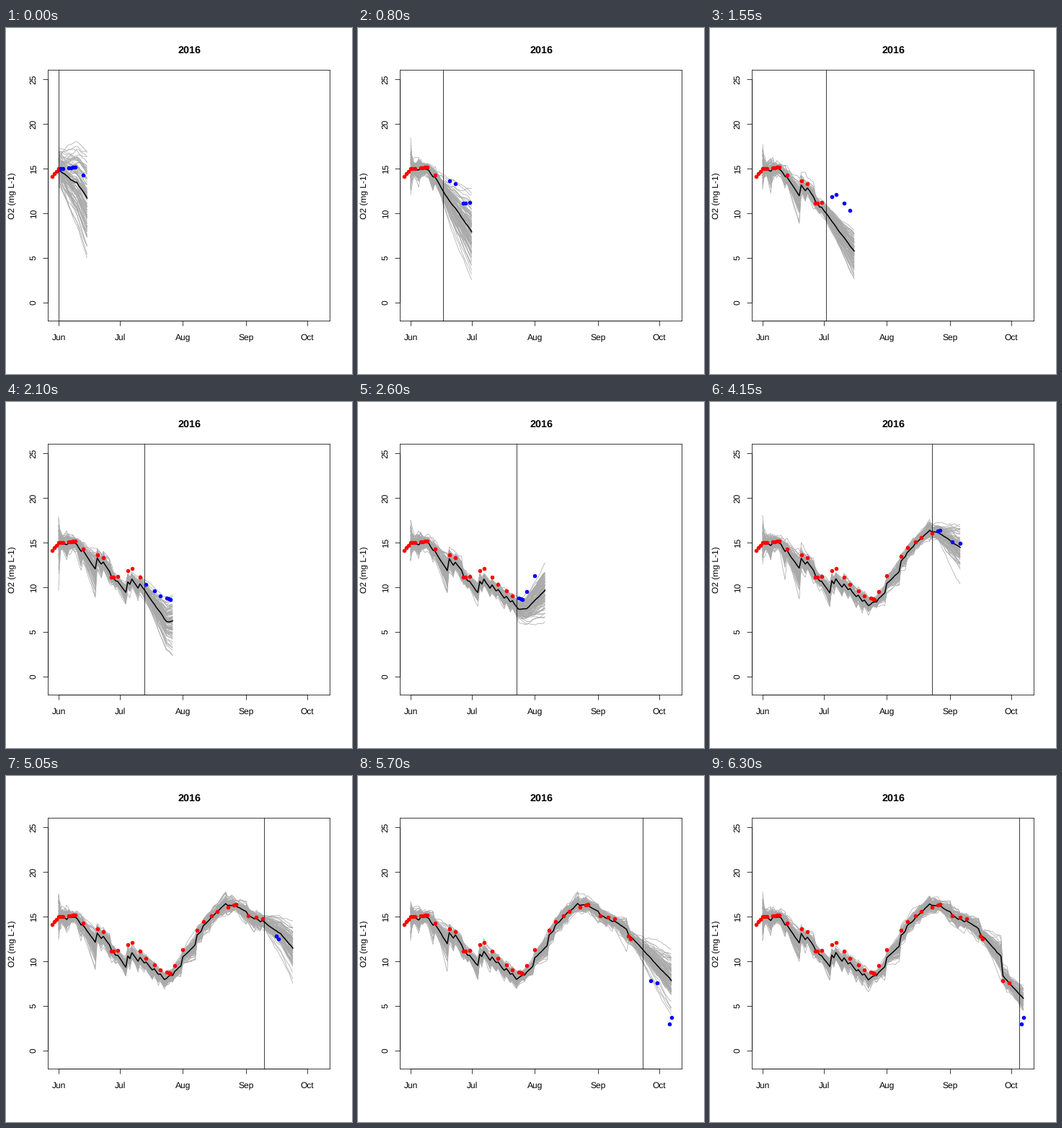
Animation of 480 by 480 pixels, one loop 6350 ms. Source, as a matplotlib script:

```python
import numpy as np
import matplotlib.pyplot as plt
from matplotlib.animation import FuncAnimation
from matplotlib.collections import LineCollection

SIZE, DPI = 480, 72
FRAMES, INTERVAL = 127, 50
HORIZON, LAST_DAY = 14, 128
MEMBERS, OBS_SD = 100, 0.5
LEFT, TOP, WIDTH, HEIGHT = 58.44, 58.44, 390.72, 347.52

plt.rcParams.update({"font.family": "Liberation Sans", "text.hinting": "none"})

# Days count from 1 June; oxygen in mg/L.
obs_day = np.array([
    -3, -2, -1, 0, 1, 2, 5, 6, 7, 8, 12, 19, 22, 26, 27, 29, 34, 36, 40, 43,
    47, 50, 53, 54, 55, 57, 61, 68, 71, 75, 78, 83, 86, 87, 93, 97, 100, 107,
    108, 118, 121, 127, 128])
trend = [(-3, 14.15), (0, 15), (8, 15.15), (12, 14.3), (22, 13.3), (26, 11.1),
         (29, 11.2), (36, 12.1), (43, 10.35), (50, 9), (55, 8.6), (61, 11.3),
         (71, 14.4), (78, 15.6), (87, 16.4), (93, 15.05), (100, 14.8),
         (108, 12.5), (118, 7.8), (121, 7.55), (127, 2.95), (128, 3.67)]
obs_o2 = np.interp(obs_day, *zip(*trend))
observed = dict(zip(obs_day.tolist(), obs_o2))

# Daily change in the model, each rate holding from its start day.
drift_from, drift_rate = zip((0, -.1), (9, -.35), (20, -.31), (53, .03),
                             (57, .22), (82, .02), (86, -.14), (109, -.24))


def drift(day):
    return drift_rate[np.searchsorted(drift_from, day, side="right") - 1]


def ensemble(today, end):
    """Model runs, pulled towards each observation up to today."""
    rng = np.random.default_rng(2016 + today)

    def draw_slopes():
        return 0.37 - rng.gumbel(size=MEMBERS), rng.normal(size=MEMBERS)

    level = rng.normal(15, 1.15, MEMBERS)
    skew, sym = draw_slopes()
    rows = [level]
    for day in range(1, end + 1):
        level = (level + drift(day - 1)
                 + (0.05 + 0.07 * np.exp(-day / 20)) * skew
                 + (0.035 + 0.22 * np.exp(-day / 10)) * sym
                 + rng.normal(0, 0.1, MEMBERS))
        if day <= today and day in observed:
            var = level.var()
            gain = var / (var + OBS_SD ** 2)
            noisy = rng.normal(0, OBS_SD, MEMBERS)
            noisy += observed[day] - noisy.mean()
            level = level + gain * (noisy - level)
            skew, sym = draw_slopes()
        rows.append(level)
    return np.array(rows).T


fig = plt.figure(figsize=(SIZE / DPI, SIZE / DPI), dpi=DPI, facecolor="white")
ax = fig.add_axes([LEFT / SIZE, 1 - (TOP + HEIGHT) / SIZE,
                   WIDTH / SIZE, HEIGHT / SIZE])
ax.set_xlim(-0.04 * LAST_DAY, 1.04 * LAST_DAY)
ax.set_ylim(-2.04, 26.04)
for spine in ax.spines.values():
    spine.set_linewidth(0.75)
ax.tick_params(length=7.2, width=0.75, labelbottom=False, labelleft=False)


def label(x, y, text, size=12, **style):
    """Text centred on its baseline, placed in pixels from the top left."""
    fig.text(x / SIZE, 1 - y / SIZE, text, size=size, ha="center",
             va="baseline", rotation_mode="anchor", **style)


months = {"Jun": 0, "Jul": 30, "Aug": 61, "Sep": 92, "Oct": 122}
levels = range(0, 26, 5)
ax.set_xticks(list(months.values()))
ax.set_yticks(levels)
for name, day in months.items():
    label(73.2 + 2.8264 * day, 433, name)
for level in levels:
    label(41.5, 380.6 - 12.376 * level, str(level), rotation=90)
label(13, 233, "O2 (mg L-1)", rotation=90)
label(254.4, 35, "2016", size=14.4, weight="bold")

# Axis lines drawn over the frame between the outer ticks.
axis = dict(color="black", lw=0.75, clip_on=False)
ax.plot([0, 122], [0, 0], transform=ax.get_xaxis_transform(), **axis)
ax.plot([0, 0], [0, 25], transform=ax.get_yaxis_transform(), **axis)

members = LineCollection([], colors="#a9a9a9", linewidths=0.75, zorder=2)
ax.add_collection(members, autolim=False)
median, = ax.plot([], [], color="black", lw=1.5, zorder=3)
now = ax.axvline(0, color="black", lw=0.75, zorder=4)
dots = dict(ls="", marker="o", ms=5.6, mew=0, zorder=5)
past, = ax.plot([], [], color="red", **dots)
future, = ax.plot([], [], color="blue", **dots)


def update(today):
    end = min(today + HORIZON, LAST_DAY)
    days = np.arange(end + 1)
    paths = ensemble(today, end)
    members.set_segments([np.column_stack([days, p]) for p in paths])
    median.set_data(days, np.median(paths, axis=0))
    now.set_xdata([today, today])
    seen = obs_day <= today
    ahead = ~seen & (obs_day <= end)
    past.set_data(obs_day[seen], obs_o2[seen])
    future.set_data(obs_day[ahead], obs_o2[ahead])
    return members, median, now, past, future


anim = FuncAnimation(fig, update, frames=FRAMES, interval=INTERVAL,
                     repeat=True, repeat_delay=0)
plt.show()
```
